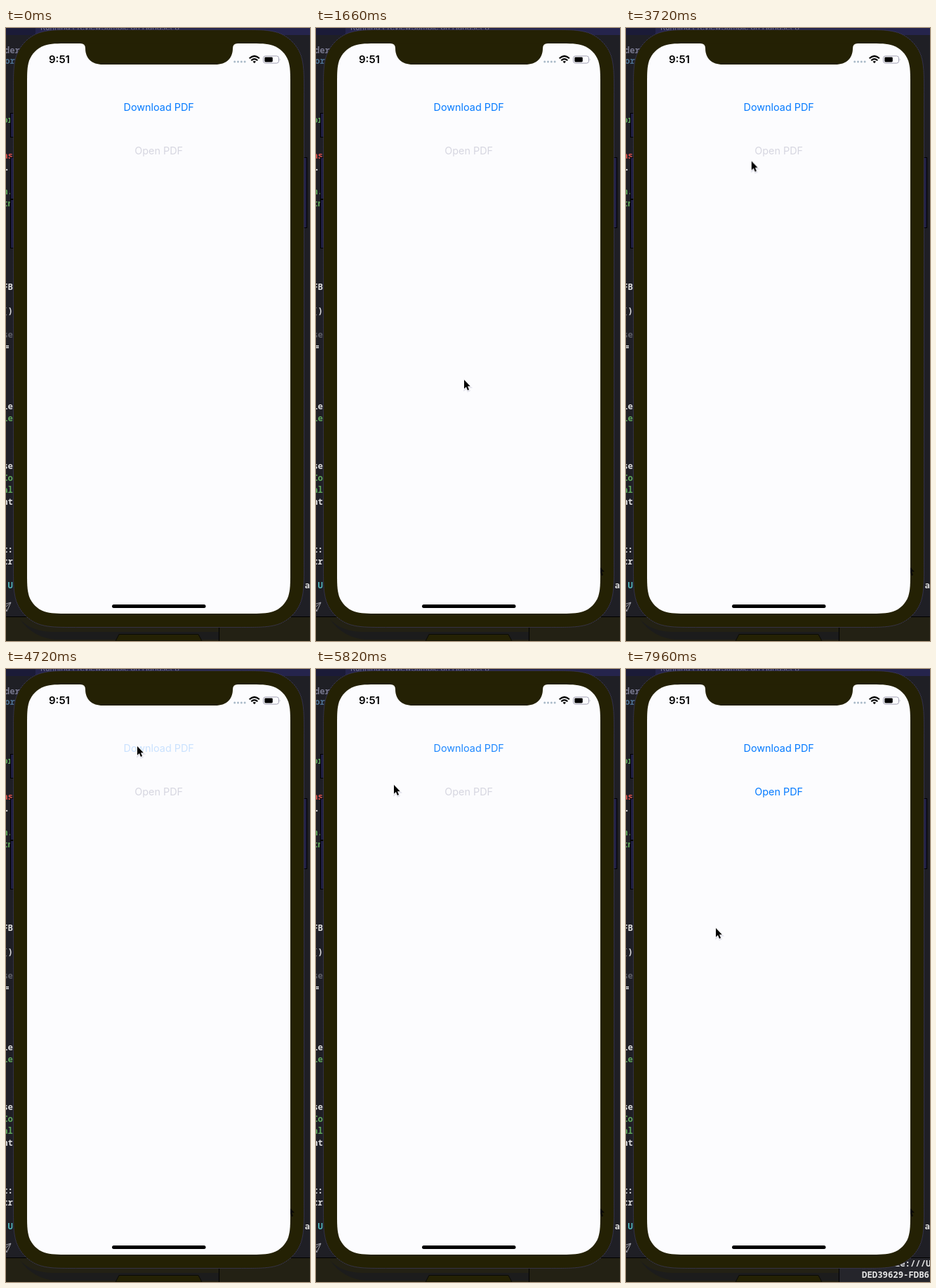
An HTML page for the animation above (8 s loop, 433x873 px).

```html
<!DOCTYPE html>
<html lang="en">
<head>
<meta charset="utf-8">
<title>PDF download demo</title>
<style>
  html, body { margin: 0; width: 100%; height: 100%; overflow: hidden; background: #1f1f25; }
  svg { display: block; width: 433px; height: 873px; }
  .ui { font-family: Inter, sans-serif; }
  .button { font-size: 14.4px; text-anchor: middle; fill: #047aff; }
  .code { font: 600 12.3px "Noto Sans Mono", monospace; }
  .body { fill: #242104; }
  .side { fill: #201f42; stroke: #000; }

  .download, .disabled, .enabled, .console, .cursor, .trail {
    animation: 8s linear infinite;
  }
  .download { animation-name: press; }
  .disabled { animation-name: disable; fill: #d6d6e0; }
  .enabled, .console { animation-name: finish; }
  .cursor { animation-name: move, enter; }
  .trail { animation-name: trail; }

  @keyframes press {
    0%, 57% { opacity: 1; }
    57.01%, 67.5% { opacity: .2; }
    73.5%, 100% { opacity: 1; }
  }
  @keyframes finish {
    0%, 76.5% { opacity: 0; }
    76.51%, 100% { opacity: 1; }
  }
  @keyframes disable {
    0%, 76.5% { opacity: 1; }
    76.51%, 100% { opacity: 0; }
  }
  @keyframes enter {
    0%, 5.5% { opacity: 0; }
    5.51%, 100% { opacity: 1; }
  }
  @keyframes trail {
    0%, 8.5% { opacity: 0; }
    8.51%, 100% { opacity: 1; }
  }
  @keyframes move {
    0%, 5.5% { transform: translate(429px, 863px); }
    8.5% { transform: translate(405px, 766px); animation-timing-function: ease-out; }
    20.75%, 22% { transform: translate(211px, 501px); animation-timing-function: ease-in-out; }
    37.75% { transform: translate(168px, 294px); animation-timing-function: ease-in-out; }
    54%, 68% { transform: translate(187px, 110px); animation-timing-function: ease-in-out; }
    72.75% { transform: translate(111px, 165px); animation-timing-function: ease-in-out; }
    80.25%, 81.5% { transform: translate(106px, 385px); animation-timing-function: ease-in-out; }
    93%, 100% { transform: translate(128px, 369px); }
  }
</style>
</head>
<body>
<svg viewBox="0 0 433 873">
  <defs>
    <path id="arrow" d="M0 0V12.8L2.9 10.1L5 15L7 14.1L5 9.3H8.8Z"/>
    <clipPath id="bezel"><rect x="405" y="760" width="28" height="30"/></clipPath>
  </defs>

  <!-- Desktop behind the phone -->
  <rect width="433" height="873" fill="#1f1f25"/>
  <rect width="433" height="10" fill="#25244c"/>
  <rect width="42" height="10" fill="#1b1b38"/>
  <text class="ui" x="49" y="2.5" font-size="11" fill="#74748f">Running PreviewSample on Handset 8</text>
  <rect y="838" width="433" height="35" fill="#232114"/>
  <path d="M20 842Q35 859 65 860H303V871H70Q38 868 20 842Z" fill="#1c1c1c"/>
  <path d="M0 838.5H433M303.5 846V873" stroke="#000"/>
  <path d="M156 873L161 863.5H274L279 873Z" fill="#242104" stroke="#0a0a06"/>
  <g class="console code" fill="#e6e6e6">
    <rect x="304" y="839" width="129" height="34" fill="#25252b"/>
    <text x="368" y="850.5">file:///U</text>
    <text x="336" y="866.5">DED39629-FDB6-</text>
    <text x="336" y="882">305E7635-053F-</text>
  </g>
  <g id="editor" class="code"></g>
  <path d="M-6 822L7 818L1 831L-1 825ZM-1 825L7 818" fill="none" stroke="#a0a0a8"/>

  <!-- Phone -->
  <rect class="side" x="6.5" y="121.5" width="9" height="34"/>
  <rect class="side" x="6.5" y="184.5" width="9" height="59"/>
  <rect class="side" x="6.5" y="244.5" width="9" height="69"/>
  <rect class="side" x="419.5" y="184.5" width="9" height="100"/>
  <path id="shell" class="body" stroke="#47447c" stroke-dasharray="1 1"/>
  <path id="screen" fill="#fcfcfe"/>
  <path class="body" d="M106 21.5V22Q113 22 113 29C113 43 122 52 138 52H298C314 52 323 43 323 29Q323 22 330 22V21.5Z"/>

  <!-- Status bar -->
  <text class="ui" x="61" y="50.3" font-size="15" font-weight="600">9:51</text>
  <path d="M325.7 48H342" stroke="#a9b9c8" stroke-width="3" stroke-linecap="round" stroke-dasharray="0 4.8"/>
  <g fill="none" stroke="#000" stroke-width="2.2">
    <path d="M346.7 43.2Q353.8 36.8 360.9 43.2M349.3 46.2Q353.8 42.2 358.3 46.2"/>
    <path d="M351.5 47.8Q353.8 46 356.1 47.8L353.8 50.2Z" fill="#000" stroke="none"/>
  </g>
  <rect x="366.5" y="39.9" width="22" height="10.2" rx="3" fill="none" stroke="#a3a2b5"/>
  <rect x="368.3" y="41.6" width="11.5" height="6.8" rx="1.4"/>
  <path d="M389.8 43.3Q391.4 45 389.8 46.7Z" fill="#a3a2b5"/>

  <!-- Screen content -->
  <g class="ui button">
    <text class="download" x="217.7" y="118.3">Download PDF</text>
    <text class="disabled" x="217.7" y="180.3">Open PDF</text>
    <text class="enabled" x="217.7" y="180.3">Open PDF</text>
  </g>
  <rect x="151" y="821" width="133.5" height="5" rx="2.5"/>

  <!-- Pointer -->
  <g class="trail" clip-path="url(#bezel)"><use href="#arrow" x="402" y="765" fill="#070602"/></g>
  <g class="cursor">
    <use href="#arrow" x=".4" y="1.2" fill="none" stroke="#a9a9c4" stroke-opacity=".3" stroke-width="2.4"/>
    <use href="#arrow" fill="#000" stroke="#fff" stroke-width="1.2" paint-order="stroke"/>
  </g>
</svg>
<script>
  const white = "#dcdcdc", green = "#5fa65a", grey = "#5f6068";
  const lines = [
    ["nder", 32, "#77778c", 20], ["or", 47, "#4d6f8f", 13], ["or", 131, green],
    ["as", 182, "#d9504b"], [".", 199, white, 5], ["n.", 233, green], ["tn", 250, green],
    ["FB", 369, white], ["()", 403, white], ["se", 437, grey], ["=", 454, white, 5],
    ["le", 539, white], ["le", 556, green], ["se", 624, white], ["Co", 641, green],
    ["al", 658, green], ["nt", 675, white], ["t:", 743, white], ["tr", 760, white],
    ["U", 794, "#4fb0b5"], ["a", 794, white, 433]
  ];
  const editor = document.getElementById("editor");
  for (const [text, y, color, right = 10] of lines) {
    const node = document.createElementNS(editor.namespaceURI, "text");
    node.textContent = text;
    node.setAttribute("x", right);
    node.setAttribute("y", y + 4.3);
    node.setAttribute("fill", color);
    node.setAttribute("text-anchor", "end");
    editor.append(node);
  }

  // Rounded rectangle whose corners ease smoothly into the straight sides.
  function smoothRect(left, top, right, bottom, radius) {
    const half = [[0, 1.529], [0, 1.088], [0, .868], [.075, .631], [.169, .373]];
    const corner = [...half, ...half.map(([a, b]) => [b, a]).reverse()];
    const place = (x, y, dx, dy, points) => points.map(
      ([a, b]) => `${x + dx * a * radius} ${y + dy * b * radius}`);
    const corners = [
      place(left, top, 1, 1, corner),
      place(right, top, -1, 1, [...corner].reverse()),
      place(right, bottom, -1, -1, corner),
      place(left, bottom, 1, -1, [...corner].reverse())
    ];
    return "M" + corners.map(([start, ...curve]) => `${start}C${curve.join(" ")}`).join("L") + "Z";
  }
  document.getElementById("shell").setAttribute("d", smoothRect(10.5, 2.5, 424.5, 853.5, 58));
  document.getElementById("screen").setAttribute("d", smoothRect(30, 22, 405, 834, 39));
</script>
</body>
</html>
```
